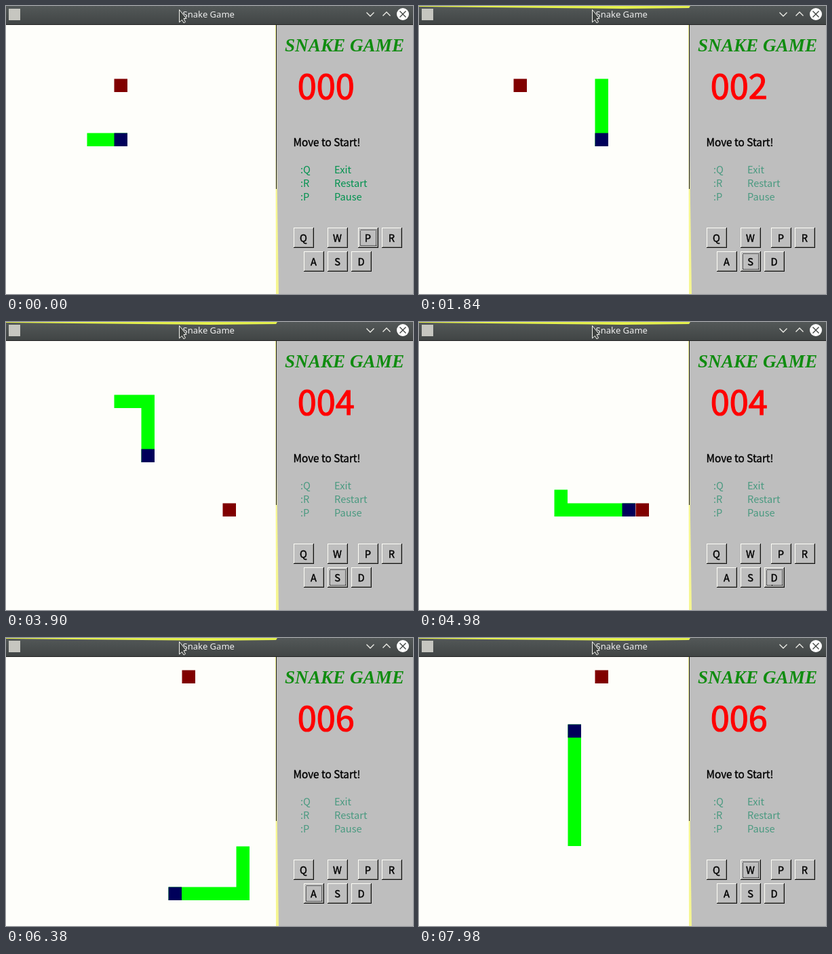
An HTML page that plays this animation: 600x425 px, repeating every 8000 ms.

```html
<!DOCTYPE html>
<html lang="en">
<head>
<meta charset="utf-8">
<title>Snake Game</title>
<style>
html, body { margin: 0; width: 100%; height: 100%; overflow: hidden; background: #bebebe; }
svg { display: block; width: 600px; height: 425px; }
text { font: 14.67px "Noto Sans CJK JP", "Noto Sans CJK", "Open Sans", sans-serif; white-space: pre; }
.caption { font: 13px "Noto Sans", sans-serif; fill: #eeeeee; }
.title { font: italic bold 27.2px "Liberation Serif", serif; fill: #108c10; }
.score { font-size: 50.5px; fill: #ff0000; stroke: #ff0000; stroke-width: 1.2px; }
.hint { font-size: 15.3px; stroke: #000; stroke-width: .4px; }
.help text { fill: #00924f; }
.running .help text { fill: #4a9a80; }
.top-glow { visibility: hidden; }
.running .top-glow { visibility: visible; }
.key text { text-anchor: middle; stroke: #000; stroke-width: .4px; }
.key .focus { fill: none; stroke: #000; stroke-dasharray: 1 1; visibility: hidden; }
.key.active .focus { visibility: visible; }
.crisp, .key path, .key rect { shape-rendering: crispEdges; }
</style>
</head>
<body>
<svg id="stage" viewBox="0 0 600 425">
  <defs>
    <linearGradient id="bar" x2="0" y2="1">
      <stop offset="0" stop-color="#535858"/>
      <stop offset="1" stop-color="#414545"/>
    </linearGradient>
  </defs>

  <rect width="600" height="425" fill="#bebebe"/>
  <rect y="27" width="399" height="398" fill="#fefefa"/>
  <path d="M397 28H399V220L402 425H398Z" fill="#f6f690"/>

  <rect width="600" height="27" fill="url(#bar)"/>
  <path class="top-glow" d="M0 0H400L398 3L300 4L200 3L0 1Z" fill="#e4f04e"/>
  <path class="crisp" d="M0 27.5H600M398.5 27V270" stroke="#222" fill="none"/>
  <rect x="4" y="4" width="17" height="17" fill="#c6c6c0"/>
  <text class="caption" x="260.500" y="17">Snake Game</text>
  <path d="M531.500 9.500L537 15L542.500 9.500M555.500 14.500L561 9L566.500 14.500" fill="none" stroke="#f0f0ea" stroke-width="1.300"/>
  <circle cx="585" cy="12" r="9" fill="#fff"/>
  <path d="M580.500 7.500L589.500 16.500M589.500 7.500L580.500 16.500" stroke="#3c403e" stroke-width="1.300"/>
  <path d="M255.500 5.500V24L259.500 20.500L262 25L264.500 23.500L262 18.500H266Z" fill="#3d413f" stroke="#f4f4f0"/>

  <text class="title" x="411" y="67">SNAKE GAME</text>
  <text class="score" id="score" x="429.700" y="137">000</text>
  <text class="hint" x="423.500" y="207">Move to Start!</text>
  <g class="help">
    <text x="434" y="247">:Q</text><text x="484" y="247">Exit</text>
    <text x="434" y="267">:R</text><text x="484" y="267">Restart</text>
    <text x="434" y="287">:P</text><text x="484" y="287">Pause</text>
  </g>
  <g id="keys"></g>

  <rect id="apple" width="19.500" height="19.500" fill="#800000"/>
  <polyline id="body" fill="none" stroke="#00ff00" stroke-width="19.500" stroke-linecap="square"/>
  <rect id="head" width="19.500" height="19.500" fill="#00005a"/>
</svg>
<script>
const LOOP = 8000, STEP = 120, START_LENGTH = 3;
const CELL = 20, SIZE = 19.5, LEFT = -0.5, TOP = 27.5;
const $ = id => document.getElementById(id);

const keyPlaces = {
  Q: [424, 327], W: [474, 327], P: [519, 327], R: [554, 327],
  A: [439, 362], S: [474, 362], D: [509, 362]
};
$('keys').innerHTML = Object.entries(keyPlaces).map(([key, [x, y]]) => `
  <g class="key" id="key${key}" transform="translate(${x} ${y})">
    <path d="M0 0H30V30H0Z" fill="#111"/>
    <path d="M0 0H29V1H1V29H0Z" fill="#fdfdf6"/>
    <path d="M1 1H29V29H1Z" fill="#888884"/>
    <path d="M1 1H28V28H1Z" fill="#bebebe"/>
    <rect class="focus" x="3.5" y="3.5" width="23" height="23"/>
    <text x="14.5" y="21">${key}</text>
  </g>`).join('');

// Each run is a direction key followed by the number of cells travelled.
const directions = { W: [0, -1], A: [-1, 0], S: [0, 1], D: [1, 0] };
const trail = [[6, 8], [7, 8], [8, 8]];
const pressed = ['P'];
for (const [, key, count] of 'W5 D5 S5 A6 W4 D3 S8 D7 S5 A6 W12'.matchAll(/(\w)(\d+)/g)) {
  const [dx, dy] = directions[key];
  for (let i = 0; i < +count; i++) {
    const [x, y] = trail.at(-1);
    trail.push([x + dx, y + dy]);
    pressed.push(key);
  }
}

const apples = [[8, 4], [13, 7], [7, 4], [10, 6], [16, 12], [17, 16], [13, 1]];
let searchFrom = 0;
const eatenAt = apples.map(([ax, ay]) => {
  const step = pressed.findIndex((_, i) => {
    const [x, y] = trail[i + START_LENGTH - 1];
    return i > searchFrom && x === ax && y === ay;
  });
  if (step < 0) return Infinity;
  return searchFrom = step;
});

const corner = ([x, y]) => [LEFT + x * CELL, TOP + y * CELL];
const center = cell => corner(cell).map(v => v + SIZE / 2);

function place(element, cell) {
  const [x, y] = corner(cell);
  element.setAttribute('x', x);
  element.setAttribute('y', y);
}

function draw(time) {
  const step = Math.min(Math.floor((time + 4) / STEP), pressed.length - 1);
  const score = eatenAt.filter(at => at <= step).length;
  const end = step + START_LENGTH;
  const snake = trail.slice(end - START_LENGTH - score, end);

  $('stage').classList.toggle('running', time >= 20);
  $('score').textContent = String(score).padStart(3, '0');
  $('body').setAttribute('points', snake.map(center).join(' '));
  place($('head'), snake.at(-1));
  place($('apple'), apples[score]);
  for (const key in keyPlaces) $('key' + key).classList.toggle('active', key === pressed[step]);
}

let origin;
function tick(now) {
  origin ??= now;
  draw((now - origin) % LOOP);
  requestAnimationFrame(tick);
}
draw(0);
requestAnimationFrame(tick);
</script>
</body>
</html>
```
